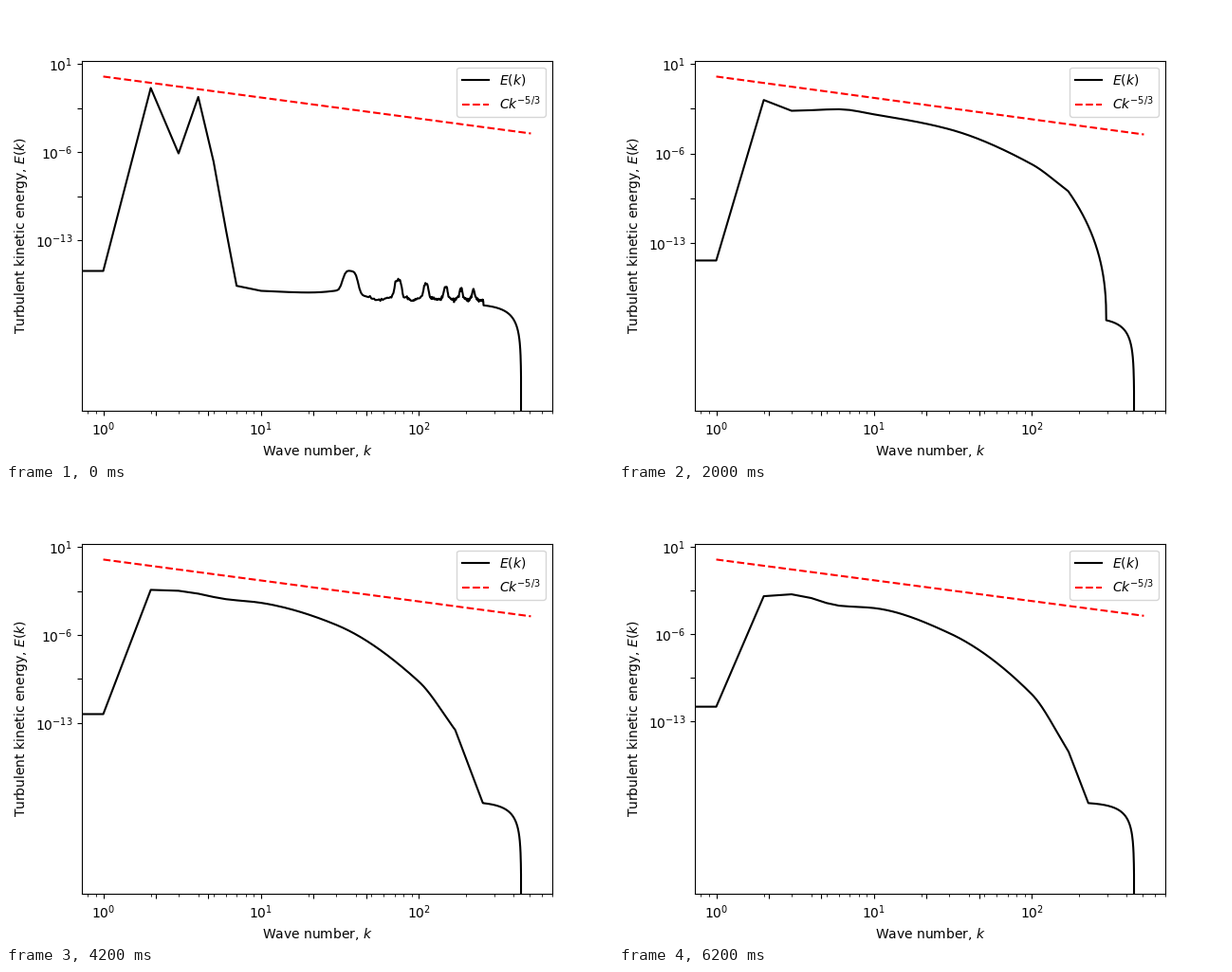
These frames come from a looping animation (640x480 px, 6400 ms). A matplotlib script:

```python
import numpy as np
import matplotlib.pyplot as plt
from matplotlib.animation import FuncAnimation

FRAMES, INTERVAL = 32, 200
K_MAX, K_CUT, K_CLIFF = 513, 445, 170
DEVELOPED = 4  # frame at which the cascade is fully formed

K = np.arange(1, K_CUT)
LOG_K = np.log10(K)

# Key moments (in frames) and the log10 energy of some modes there
KEYS = [4, 10, 18, 24, 31]
MODES = {
    1: [-15.66, -14.34, -12.42, -12.17, -11.81],
    3: [-1.42, -2.67, -2.42, -2.55, -2.79],
    30: [-4.5, -4.11, -5.05, -5.35, -5.91],
    100: [-7.07, -6.84, -9.49, -9.93, -10.82],
    K_CLIFF: [-9.64, -8.94, -13.66, -13.45, -15.35],
}
KNEE = [296, 296, 243, 266, 228]  # where the drop meets the noise shelf


def monotone(x, xp, yp):
    """Shape-preserving cubic through (xp, yp)."""
    h = np.diff(xp)
    d = np.diff(yp) / h
    a, b = d[:-1], d[1:]
    same = a * b > 0
    m = np.concatenate([[d[0]], np.zeros(len(a)), [d[-1]]])
    m[1:-1][same] = 2 * a[same] * b[same] / (a[same] + b[same])
    i = np.clip(np.searchsorted(xp, x, side="right") - 1, 0, len(h) - 1)
    t = (x - xp[i]) / h[i]
    return (yp[i] * (1 + 2 * t) * (1 - t) ** 2 + h[i] * m[i] * t * (1 - t) ** 2
            + yp[i + 1] * t * t * (3 - 2 * t) + h[i] * m[i + 1] * t * t * (t - 1))


def lowest(frame):
    """log10 of the smallest energy, which sets the vertical scale."""
    if frame < DEVELOPED:
        return -25.26 + 0.91 * frame / DEVELOPED
    return -24.35 - 1.45 * (1 - np.exp((DEVELOPED - frame) / 15))


def shelf(k, level):
    return level + 2.84 * np.log10(1 - (k / K_CUT) ** 4)


def initial_spectrum():
    """Two energetic modes, a noise floor with harmonics, and a cut-off."""
    k_points = [1, 2, 3, 4, 5, 6, 7, 10, 30, 55]
    levels = [-15.42, -0.91, -6.1, -1.62, -6.74, -12.2, -16.6, -17, -17.3, -17.8]
    y = np.interp(LOG_K, np.log10(k_points), levels)
    for n in range(1, 7):
        d = K - 37 * n
        y += 1.6 * 0.75 ** (n - 1) * np.exp(-(d / 4.6) ** 4)
        y += 0.45 * np.exp(-(d / 12) ** 2)
    y += np.where(K > 43, np.random.default_rng(4).normal(0, 0.06, K.size), 0)
    return np.where(K < 257, y, shelf(K, -18))


def cascade(frame):
    """Slowly decaying large scales, a steep drop, then the noise shelf."""
    modes = {k: np.interp(frame, KEYS, levels) for k, levels in MODES.items()}
    modes[2] = -1.3 - 0.053 * frame
    modes[6] = -2.0 - 0.055 * frame
    modes[10] = -2.5 - 0.045 * frame
    k_points = np.array(sorted(modes))
    y = monotone(LOG_K, np.log10(k_points), np.array([modes[k] for k in k_points]))

    level = lowest(frame) + 6.1
    knee = np.interp(frame, KEYS, KNEE)
    u = np.clip(np.log(K / K_CLIFF) / np.log(knee / K_CLIFF), 0, 1)
    bend = 0.42 + 0.58 * np.clip((frame - 10) / 4, 0, 1)
    start = modes[K_CLIFF]
    drop = start + (shelf(knee, level) - start) * (1 - (1 - u) ** bend)
    return np.where(K < K_CLIFF, y, np.where(K < knee, drop, shelf(K, level)))


INITIAL, FORMED = initial_spectrum(), cascade(DEVELOPED)


def log_energy(frame):
    if frame >= DEVELOPED:
        return cascade(frame)
    w = (frame / DEVELOPED) ** 0.6
    return (1 - w) * INITIAL + w * FORMED


fig, ax = plt.subplots(figsize=(6.4, 4.8), dpi=100)
k_line = np.arange(1, K_MAX + 1)
spectrum, = ax.loglog([1, 2], [1, 1], "k-", label="$E(k)$")
ax.loglog(k_line, k_line ** (-5 / 3), "r--", label="$Ck^{-5/3}$")
ax.set_xlabel("Wave number, $k$")
ax.set_ylabel("Turbulent kinetic energy, $E(k)$")
ax.set_xticks(np.logspace(0, 2, 7))
ax.set_yticks(np.logspace(-13, 1, 5))
ax.set_xlim(K_MAX ** -0.05, K_MAX ** 1.05)
ax.legend(loc="upper right")


def update(frame):
    energy = 10 ** log_energy(frame)
    spectrum.set_data(np.r_[0.5, K, K_CUT], np.r_[energy[0], energy, 0])
    low = lowest(frame)
    ax.set_ylim(10 ** (1.05 * low), 10 ** (-0.05 * low))
    return spectrum,


anim = FuncAnimation(fig, update, frames=FRAMES, interval=INTERVAL,
                     init_func=lambda: update(0), repeat=True, repeat_delay=0)
plt.show()
```
